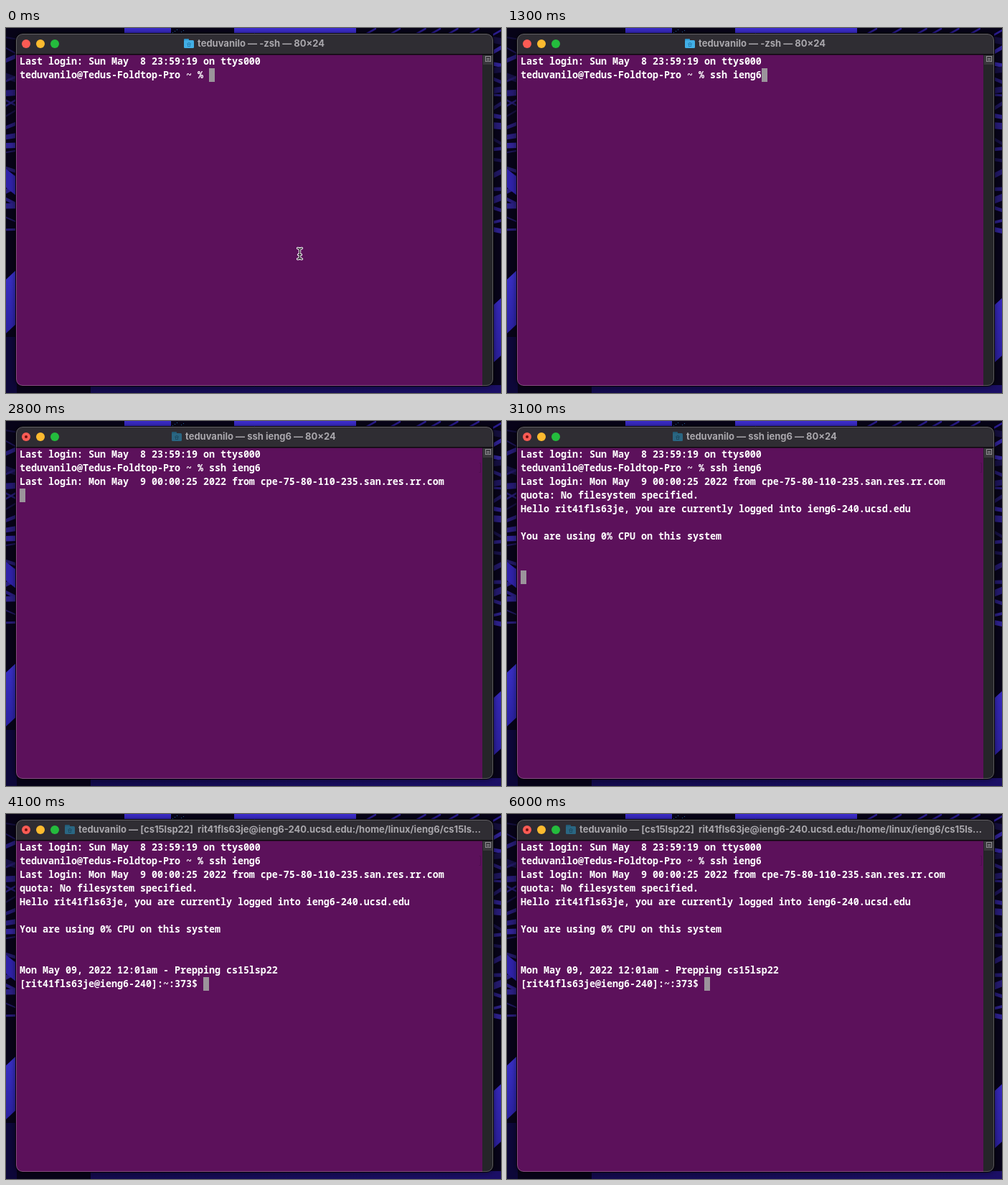
Write an HTML page with a canvas that moves like this. It is 690x508 px and loops after 6.1 s.

```html
<!DOCTYPE html>
<html lang="en">
<head>
<meta charset="utf-8">
<title>Terminal login</title>
<style>
  html, body { margin: 0; width: 100%; height: 100%; overflow: hidden; background: #070318; }
  canvas { display: block; }
</style>
</head>
<body>
<canvas id="stage" width="690" height="508"></canvas>
<script>
const ctx = document.getElementById("stage").getContext("2d");
const LOOP = 6100, STEP = 100;
const CELL = 8, ROW = 19, LEFT = 19, TOP = 37;
const WIN = { x: 14, y: 8, w: 665, h: 490, r: 9 };

const USER = "teduvanilo";
const ACCOUNT = "rit41fls63je";
const PROMPT = USER + "@Tedus-Foldtop-Pro ~ % ";
const COMMAND = "ssh ieng6";
const KEYS = { start: 300, gap: 110 };
const ENTER = 1600, READY = 3700;

// Text printed by the remote host, with the time each block arrives.
const OUTPUT = [
  [2500, ["Last login: Mon May  9 00:00:25 2022 from cpe-75-80-110-235.san.res.rr.com"]],
  [2900, ["quota: No filesystem specified.",
          `Hello ${ACCOUNT}, you are currently logged into ieng6-240.ucsd.edu`,
          "", "You are using 0% CPU on this system", "", ""]],
  [3500, ["Mon May 09, 2022 12:01am - Prepping cs15lsp22"]]
];

function seeded(seed) {
  return () => {
    seed = (seed * 16807) % 2147483647;
    return seed / 2147483647;
  };
}

function rect(color, x, y, w, h) {
  ctx.fillStyle = color;
  ctx.fillRect(x, y, w, h);
}

function disc(color, x, y, r) {
  ctx.fillStyle = color;
  ctx.beginPath();
  ctx.arc(x, y, r, 0, Math.PI * 2);
  ctx.fill();
}

function rounded(x, y, w, h, r) {
  ctx.beginPath();
  ctx.roundRect(x, y, w, h, r);
}

function windowPath(inset) {
  rounded(WIN.x + inset, WIN.y + inset, WIN.w - 2 * inset, WIN.h - 2 * inset, WIN.r - inset);
}

// A slanted band; slope is the vertical rise across its width.
function band(color, x, y, w, h, slope) {
  ctx.fillStyle = color;
  ctx.beginPath();
  ctx.moveTo(x, y);
  ctx.lineTo(x + w, y + slope);
  ctx.lineTo(x + w, y + h + slope);
  ctx.lineTo(x, y + h);
  ctx.fill();
}

function fade(from, to, x0, y0, x1, y1) {
  const gradient = ctx.createLinearGradient(x0, y0, x1, y1);
  gradient.addColorStop(0, from);
  gradient.addColorStop(1, to);
  return gradient;
}

function drawWallpaper() {
  const random = seeded(23);
  rect("#070318", 0, 0, 690, 508);

  // Thin leaves beside the upper half of the window.
  for (const x of [0, 679]) {
    for (let y = 12; y < 290; y += 7 + random() * 14) {
      const light = 14 + random() * 22;
      band(`hsl(247 62% ${light}%)`, x, y, 15, 2 + random() * 8, 10 - random() * 20);
    }
  }

  // Broad blue panels along the edges.
  band("#3a2bc8", 165, 0, 65, 9, 0);
  band("#3d2dd0", 318, 0, 170, 9, 0);
  for (let x = 500; x < 690; x += 14 + random() * 22) {
    band("#2a1c90", x, 8, 16, 3, -9);
  }
  band(fade("#3a30c6", "#2a20a0", 0, 335, 0, 425), 0, 350, 15, 75, -14);
  band("#2f22a8", 0, 196, 15, 26, 12);
  band(fade("#3528b8", "#2b1f9c", 0, 380, 0, 466), 679, 386, 11, 80, -10);
  band("#0d0739", 0, 430, 15, 78, 0);
  band(fade("#120a4c", "#1b0f66", 115, 0, 690, 0), 118, 497, 572, 11, 0);

  for (let i = 0; i < 7; i++) rect("#256fae", 229 + i * 3, 1 + (i * 5) % 7, 1, 1);
}

function drawFolder(x, active) {
  const [back, front, mark] = active
    ? ["#2d91c8", "#42afe6", "#2682b7"]
    : ["#225a75", "#2a6682", "#1d4c63"];
  ctx.fillStyle = back;
  rounded(x, 15, 7, 5, 1);
  ctx.fill();
  ctx.fillStyle = front;
  rounded(x, 17, 14, 11, 1.5);
  ctx.fill();
  ctx.strokeStyle = mark;
  ctx.lineWidth = 1;
  ctx.beginPath();
  ctx.moveTo(x + 4, 22.5);
  ctx.lineTo(x + 7, 20);
  ctx.lineTo(x + 10, 22.5);
  ctx.stroke();
  ctx.strokeRect(x + 5.5, 22.5, 3, 3);
}

function titleAt(t) {
  if (t < ENTER) return [248, USER + " — -zsh — 80×24"];
  if (t < READY) return [231, USER + " — ssh ieng6 — 80×24"];
  return [82, `${USER} — [cs15lsp22]  ${ACCOUNT}@ieng6-240.ucsd.edu:/home/linux/ieng6/cs15ls…`];
}

function drawWindow(t) {
  const running = t >= ENTER;
  ctx.save();
  ctx.shadowColor = "rgba(0,0,0,.65)";
  ctx.shadowBlur = 8;
  ctx.fillStyle = "#2f2d33";
  windowPath(0);
  ctx.fill();
  ctx.restore();

  ctx.save();
  windowPath(0);
  ctx.clip();
  rect("#5c115b", 14, 37, 650, 461);
  rect("#252529", 664, 37, 15, 461);
  rect("#0b090c", 14, 36, 665, 1.5);
  ctx.restore();

  ctx.lineWidth = 1;
  ctx.strokeStyle = "#050308";
  windowPath(-0.5);
  ctx.stroke();
  ctx.strokeStyle = "rgba(255,255,255,.24)";
  windowPath(0.5);
  ctx.stroke();

  ["#fb5b54", "#fcbb2f", "#24bc3d"].forEach((color, i) => disc(color, 28 + i * 20, 22, 6));
  if (running) disc("#70100f", 28, 22, 2);

  // Split-pane button above the scroll track.
  rect("#39383c", 665, 38, 13, 13);
  ctx.strokeStyle = "#918f94";
  ctx.strokeRect(668.5, 39.5, 7, 7);
  rect("#918f94", 670, 42, 4, 1);
  rect("#918f94", 670, 44, 4, 1);

  const [x, title] = titleAt(t);
  drawFolder(x, !running);
  ctx.font = "700 13px Inter, sans-serif";
  ctx.fillStyle = "#a9a7ac";
  ctx.fillText(title, x + 19, 26);

  if (running) {
    ctx.strokeStyle = "#4c104d";
    ctx.beginPath();
    ctx.moveTo(659.5, 58.5);
    ctx.lineTo(661.5, 58.5);
    ctx.lineTo(661.5, 71.5);
    ctx.lineTo(659.5, 71.5);
    ctx.stroke();
  }
}

function linesAt(t) {
  const typed = Math.max(0, Math.floor((t - KEYS.start) / KEYS.gap) + 1);
  const lines = ["Last login: Sun May  8 23:59:19 on ttys000", PROMPT + COMMAND.slice(0, typed)];
  for (const [time, block] of OUTPUT) if (t >= time) lines.push(...block);
  if (t >= READY) lines.push(`[${ACCOUNT}@ieng6-240]:~:373$ `);
  else if (t >= ENTER) lines.push("");
  return lines;
}

function drawText(t) {
  const lines = linesAt(t), last = lines.length - 1;
  rect("#9b949b", LEFT + lines[last].length * CELL, TOP + last * ROW, CELL, ROW);
  ctx.font = "600 13.333px 'Noto Sans Mono', 'DejaVu Sans Mono', monospace";
  ctx.fillStyle = "#fff";
  lines.forEach((line, i) => ctx.fillText(line, LEFT, TOP + 14 + i * ROW));
}

function drawPointer(x, y) {
  ctx.lineCap = "round";
  for (const [color, width] of [["#e9e4ea", 3.4], ["#171018", 1.2]]) {
    ctx.strokeStyle = color;
    ctx.lineWidth = width;
    ctx.beginPath();
    for (const side of [-1, 1]) {
      ctx.moveTo(x + side * 3, y - 7.5);
      ctx.quadraticCurveTo(x, y - 7.5, x, y - 5);
      ctx.lineTo(x, y + 5);
      ctx.quadraticCurveTo(x, y + 7.5, x + side * 3, y + 7.5);
    }
    ctx.moveTo(x - 2, y + 1.5);
    ctx.lineTo(x + 2, y + 1.5);
    ctx.stroke();
  }
  ctx.lineCap = "butt";
}

function render() {
  const t = Math.floor((performance.now() % LOOP) / STEP) * STEP;
  drawWallpaper();
  drawWindow(t);
  drawText(t);
  if (t < KEYS.start) drawPointer(409.5, 314);
  requestAnimationFrame(render);
}

render();
</script>
</body>
</html>
```
